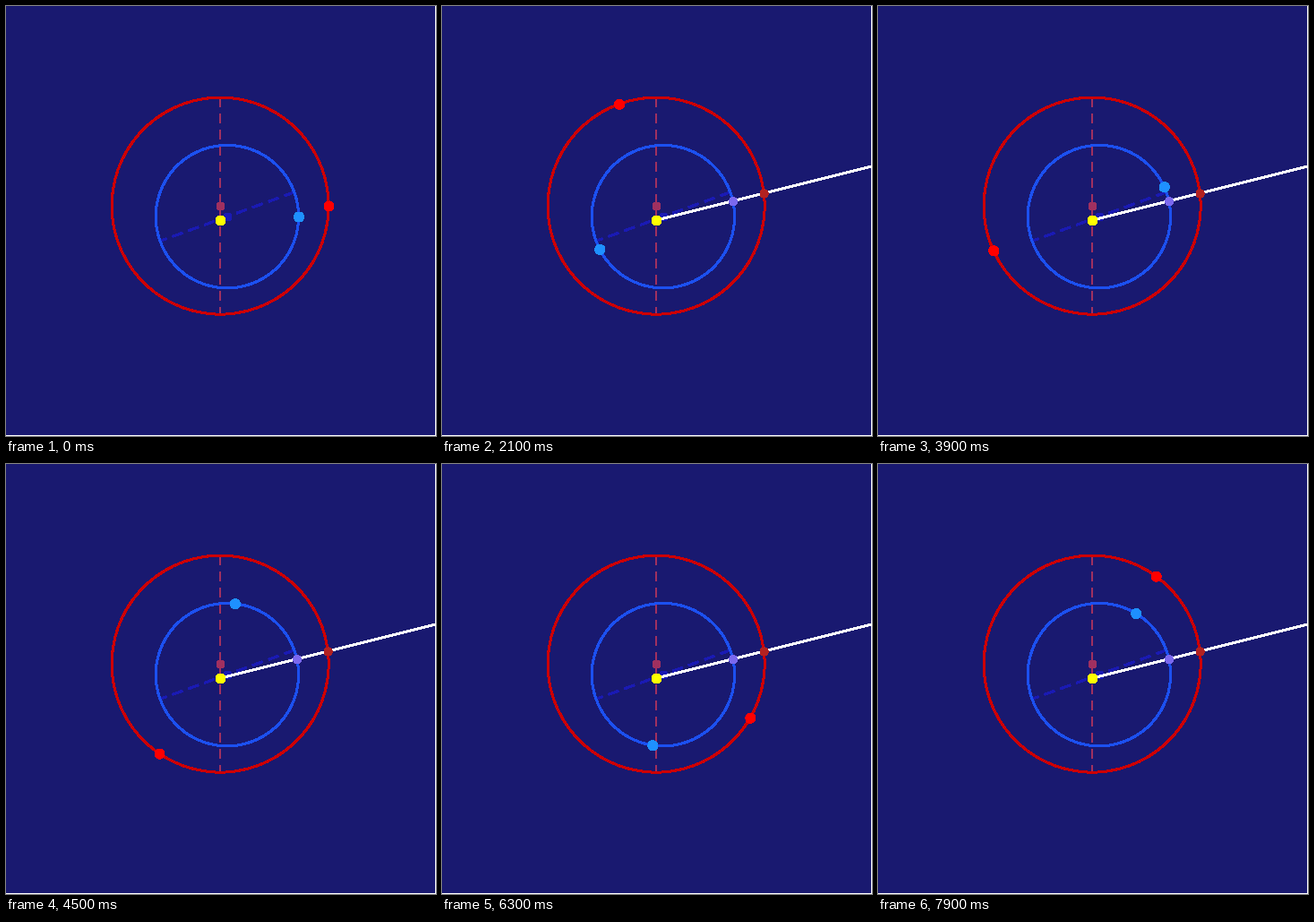
Write a matplotlib script that moves like this. It is 480 by 480 pixels and loops after 8000 ms.

```python
import numpy as np
import matplotlib.pyplot as plt
from matplotlib.animation import FuncAnimation
from matplotlib.patches import Circle

SIZE, DPI = 480, 100
STAGE = SIZE - 1              # a white pixel remains on the right and bottom
PX = 72 / DPI                 # one pixel in points
FRAMES, INTERVAL = 80, 100
DAYS_PER_FRAME = 10
OPPOSITION_DAY = 12.7
DASH, GAP = 10.5, 7.2
PEN = np.array([-0.4, -0.4])  # hard-edged strokes sit up and left of the dots

SUN = np.array([239.5, 239.5])
EARTH = dict(center=np.array([247.3, 235.5]), radius=79.7, period=365)
MARS = dict(center=np.array([239.5, 223.5]), radius=121, period=687)

fig = plt.figure(figsize=(SIZE / DPI, SIZE / DPI), dpi=DPI, facecolor="white")
ax = fig.add_axes([0, 1 / SIZE, STAGE / SIZE, STAGE / SIZE], facecolor="midnightblue")
ax.set(xlim=(0, STAGE), ylim=(STAGE, 0), xticks=[], yticks=[])
ax.spines[:].set_visible(False)


def on_orbit(orbit, angle):
    return orbit["center"] + orbit["radius"] * np.array([np.cos(angle), -np.sin(angle)])


def position(orbit, day):
    return on_orbit(orbit, 2 * np.pi * day / orbit["period"])


def dot(center, radius, color, z):
    return ax.add_patch(Circle(center, radius, facecolor=color, edgecolor="none",
                               antialiased=False, zorder=z))


def segment(a, b, color, z, style="-"):
    a, b = a + PEN, b + PEN
    return ax.plot([a[0], b[0]], [a[1], b[1]], color=color, lw=2 * PX, ls=style,
                   antialiased=False, zorder=z,
                   solid_capstyle="butt", dash_capstyle="butt")[0]


def draw_orbit(orbit, color, axis_color, tilt):
    ax.add_patch(Circle(orbit["center"] + PEN, orbit["radius"], fill=False, edgecolor=color,
                        lw=2 * PX, antialiased=False, zorder=2))
    # dashes are counted along the longer screen axis
    scale = 2 * max(abs(np.cos(tilt)), abs(np.sin(tilt)))
    segment(on_orbit(orbit, tilt), on_orbit(orbit, tilt + np.pi),
            axis_color, 1, (0, (DASH / scale, GAP / scale)))
    dot(orbit["center"], 4.5, axis_color, 3)


draw_orbit(EARTH, "#1c50f0", "#1a1ab4", np.radians(20))
draw_orbit(MARS, "#cd0000", "#a03060", np.pi / 2)
dot(SUN, 5.5, "yellow", 6)

earth_mark = position(EARTH, OPPOSITION_DAY)
mars_mark = position(MARS, OPPOSITION_DAY)
opposition = [
    segment(SUN, SUN + 3 * (mars_mark - SUN), "white", 4),
    dot(earth_mark, 4.5, "mediumslateblue", 5),
    dot(mars_mark, 4.5, "firebrick", 5),
]
earth = dot(position(EARTH, 0), 5.5, "dodgerblue", 7)
mars = dot(position(MARS, 0), 5.5, "red", 7)


def update(frame):
    day = frame * DAYS_PER_FRAME
    earth.center = position(EARTH, day)
    mars.center = position(MARS, day)
    for artist in opposition:
        artist.set_visible(day >= OPPOSITION_DAY)
    return [earth, mars, *opposition]


anim = FuncAnimation(fig, update, frames=FRAMES, interval=INTERVAL,
                     repeat=True, repeat_delay=0, blit=False)
plt.show()
```
